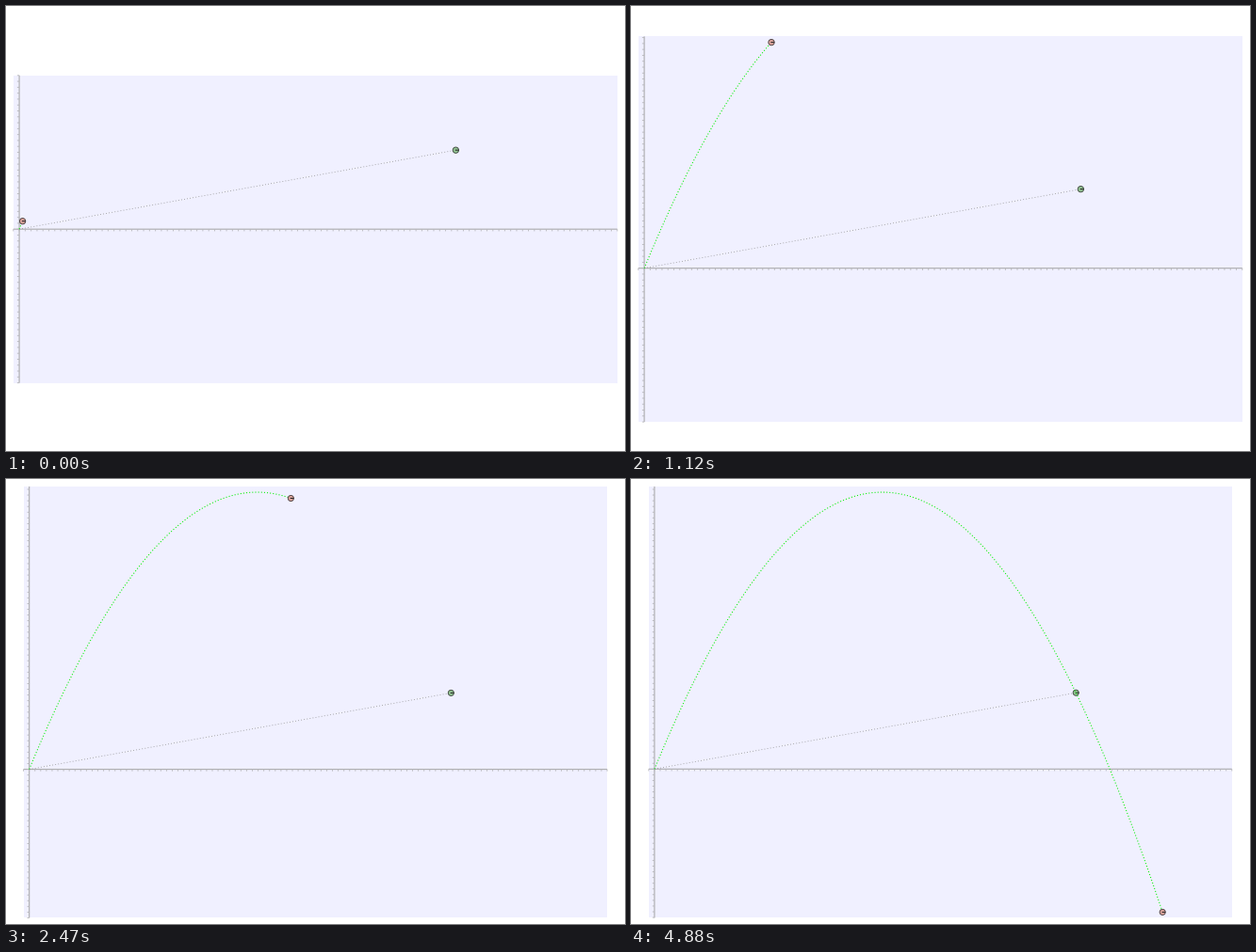
Animation, 657 px wide and 473 px high, one loop 4960 ms. Source, as a matplotlib script:

```python
import numpy as np
import matplotlib.pyplot as plt
from matplotlib.animation import FuncAnimation
from matplotlib.collections import LineCollection
from matplotlib.patches import Circle, Rectangle

W, H, DPI = 657, 473, 64
PX = 72 / DPI                      # one pixel in points
LOOP, STEP = 4960, 20
TICK, LAST = 47.4, 103             # ms per picture, last picture
CX, CY = 328.3, 237.2              # centre of the plot on the stage
MAX_W, MAX_H = 641, 458.5          # largest plot size in pixels
X0, X1, MARGIN = -1, 101, 1
RANGE, PEAK = 79.65, 48.5          # landing distance and height of the throw
SPEED = 0.846                      # distance per picture
AIM = 73.72


def height(x):
    return PEAK * (1 - (2 * x / RANGE - 1) ** 2)


def distance(n):
    """Steady flight that gains a little lead in the first half."""
    return SPEED * (n + min(2.05, 0.66 + 0.03 * n))


fig = plt.figure(figsize=(W / DPI, H / DPI), dpi=DPI, facecolor="white")
ax = fig.add_axes([0, 0, 1, 1])
ax.axis("off")

panel = ax.add_patch(Rectangle((X0, 0), X1 - X0, 1, fc="#f0f0ff", ec="none", zorder=0))


def segments(color, width):
    lines = LineCollection([], colors=color, linewidths=width * PX, zorder=1)
    lines.set_snap(False)
    return ax.add_collection(lines, autolim=False)


def dotted(color, width, gap, z):
    return ax.plot([], [], color=color, lw=width * PX, ls=(0, (1, gap)), zorder=z)[0]


def marker(fill, edge, z):
    disc = ax.add_patch(Circle((0, 0), 0.5, fc=fill, ec=edge, lw=0.9 * PX, zorder=z))
    hand, = ax.plot([], [], color="#222222", lw=PX, zorder=z + 0.1,
                    solid_capstyle="butt", snap=False)
    return disc, hand


def place(mark, x, y):
    disc, hand = mark
    disc.center = (x, y)
    hand.set_data([x - 0.1, x + 0.5], [y, y])


axis_lines = segments("#b0b0b2", 1.2)
ticks = segments("#b8b8bc", 0.9)
sight = dotted("#888888", 0.8, 2.9, 2)
trail = dotted("#00f000", 1.05, 2, 4)
goal = marker("#93c493", "#3f4a3f", 3)
ball = marker("#dca49c", "#4d4040", 5)

sight.set_data([0, AIM], [0, height(AIM)])
place(goal, AIM, height(AIM))


def set_view(low, top):
    scale = min(MAX_W / (X1 - X0), MAX_H / (top - low))
    mid_x, mid_y = (X0 + X1) / 2, (low + top) / 2
    ax.set_xlim(mid_x - CX / scale, mid_x + (W - CX) / scale)
    ax.set_ylim(mid_y - (H - CY) / scale, mid_y + CY / scale)
    panel.set_y(low)
    panel.set_height(top - low)
    axis_lines.set_segments([[(X0, 0), (X1, 0)], [(0, low), (0, top)]])
    ticks.set_segments(
        [[(i, 0), (i, -0.35)] for i in range(X0, X1 + 1)]
        + [[(0, j), (-0.35, j)] for j in range(int(np.ceil(low)), int(top) + 1)])


def draw(i):
    n = min(int((i + 1) * STEP / TICK), LAST)
    x = distance(n)
    y = height(x)
    highest = height(min(x, RANGE / 2))
    set_view(min(-26, y - MARGIN), max(26, highest + MARGIN))
    path = np.linspace(0, x, 200)
    trail.set_data(path, height(path))
    place(ball, x, y)
    return []


anim = FuncAnimation(fig, draw, frames=LOOP // STEP, interval=STEP,
                     init_func=lambda: draw(0), repeat=True, repeat_delay=0)
plt.show()
```
